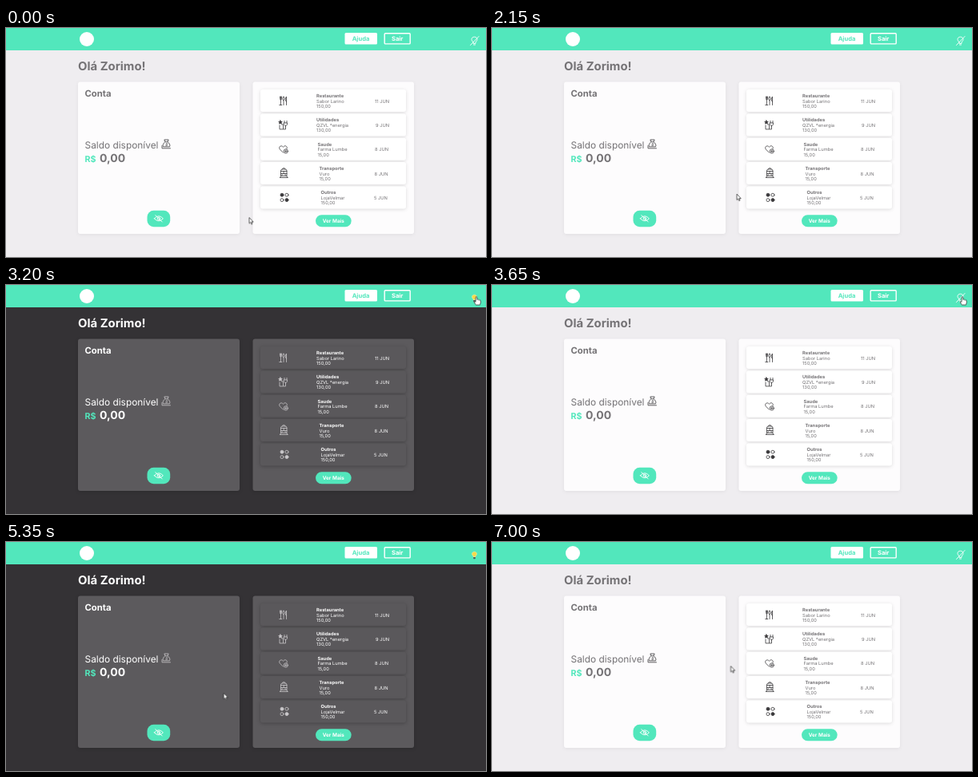
Write an HTML page that moves like this. It is 600x287 px and loops after 7.35 s.

```html
<!DOCTYPE html>
<html lang="pt">
<head>
<meta charset="utf-8">
<title>Conta</title>
<style>
html, body { margin: 0; width: 100%; height: 100%; overflow: hidden; }
svg { display: block; width: 100vw; height: 100vh; background: var(--bg);
  font-family: Inter, "Open Sans", sans-serif; text-rendering: geometricPrecision;
  --mint: #52e7bc; animation: theme 7.35s step-end infinite; }
text { fill: var(--ink); }
.b { font-weight: 700; }
.mint { fill: var(--mint); }
.white { fill: #fff; }
.mid { text-anchor: middle; font-weight: 700; }
.row { font-size: 5.75px; }
.card { fill: var(--card); filter: drop-shadow(0 1px 2px var(--soft)); }
.item { fill: var(--item); filter: drop-shadow(0 1.5px 2px var(--shade)); }
.icon { fill: none; stroke: var(--icon); stroke-width: .8; stroke-linecap: round; stroke-linejoin: round; }
.icon .full { fill: var(--icon); }
.line { fill: none; stroke: #fff; stroke-width: .9; stroke-linecap: round; stroke-linejoin: round; }
.off { visibility: var(--off); }
.on { visibility: var(--on); }
.shown { animation: shown 7.35s step-end infinite; }
.label { animation: drop 7.35s step-end infinite; }
.cursor { animation: move 7.35s linear infinite; }
.hand { animation: hand 7.35s step-end infinite; }
.arrow { animation: arrow 7.35s step-end infinite; }
.cursor path { fill: #fff; stroke: #222; stroke-width: .7; stroke-linejoin: round; }

@keyframes theme {
  0%, 49.6%, 80.9%, 100% {
    --bg: #efedf0; --card: #fdfcfd; --item: #fff; --ink: #757376; --icon: #3c3a3d;
    --soft: rgba(0,0,0,.06); --shade: rgba(0,0,0,.13); --off: visible; --on: hidden; }
  43.48%, 54.35% {
    --bg: #343235; --card: #5c5a5d; --item: #5a585b; --ink: #fff; --icon: #c9c7ca;
    --soft: rgba(0,0,0,.14); --shade: rgba(0,0,0,.25); --off: hidden; --on: visible; }
}
@keyframes shown { 0%, 23.76%, 100% { visibility: visible; } 17.63% { visibility: hidden; } }
@keyframes drop { 0%, 23.76%, 100% { transform: none; } 17.63% { transform: translateY(8.5px); } }
@keyframes hand {
  0%, 27.2%, 58.8%, 82.3%, 100% { visibility: hidden; }
  15.4%, 38.8%, 77.9% { visibility: visible; }
}
@keyframes arrow {
  0%, 27.2%, 58.8%, 82.3%, 100% { visibility: visible; }
  15.4%, 38.8%, 77.9% { visibility: hidden; }
}
@keyframes move {
  0% { transform: translate(304px, 237.5px); animation-timing-function: step-end; }
  6.75% { transform: translate(303px, 237.2px); }
  9.5% { transform: translate(303px, 237.2px); animation-timing-function: ease-in-out; }
  17% { transform: translate(198px, 238px); }
  24.3% { transform: translate(198px, 238px); animation-timing-function: ease-in; }
  28.2% { transform: translate(258px, 224px); }
  33.3% { transform: translate(488px, 148px); animation-timing-function: ease-out; }
  39.8% { transform: translate(588px, 14.5px); }
  55% { transform: translate(588px, 14.5px); animation-timing-function: ease-in; }
  59.5% { transform: translate(580px, 26px); }
  64% { transform: translate(420px, 130px); animation-timing-function: ease-out; }
  69.4% { transform: translate(200px, 228px); animation-timing-function: ease-in; }
  72.8% { transform: translate(272px, 189.5px); }
  76.2% { transform: translate(490px, 70px); animation-timing-function: ease-out; }
  78.9% { transform: translate(588px, 14.5px); }
  81.3% { transform: translate(588px, 14.5px); animation-timing-function: ease-in-out; }
  90.5% { transform: translate(300.5px, 156px); }
  91.8%, 100% { transform: translate(298.5px, 155.5px); }
}
</style>
</head>
<body>
<svg viewBox="0 0 600 287" preserveAspectRatio="none">
  <rect class="mint" width="600" height="28"/>
  <circle class="white" cx="101" cy="14" r="9"/>
  <rect class="white" x="423.5" y="6" width="40.5" height="14.5" rx="1.5"/>
  <text class="mid mint" x="443.5" y="16.2" font-size="7.6">Ajuda</text>
  <rect x="473.2" y="6.7" width="32" height="13.2" rx="1" fill="none" stroke="#fff" stroke-width="1.4"/>
  <text class="mid white" x="489.2" y="16.2" font-size="7.6">Sair</text>

  <g class="line off">
    <path d="M584 19v-1.4c-3-2-2.7-6.3 1.5-6.4 4.200 .1 4.500 4.400 1.500 6.400V19zM584.500 21h2M580.500 21.500L591 10.500"/>
  </g>
  <g class="on">
    <path d="M584 18.500v-1c-2.300-1.600-1.900-5.200 1.500-5.300 3.400 .1 3.800 3.700 1.500 5.300v1z" fill="#f7d84a" stroke="#fff3b0" stroke-width=".5"/>
    <path d="M584.200 19h2.600v1.500l-.6 .8h-1.400l-.6-.8z" fill="#555"/>
  </g>

  <text class="b" x="90" y="53" font-size="14.9">Olá Zorimo!</text>
  <rect class="card" x="90" y="67.500" width="202" height="190.500" rx="3"/>
  <rect class="card" x="308.500" y="67.500" width="201.500" height="190.500" rx="3"/>

  <text class="b" x="98.500" y="86.300" font-size="11.300">Conta</text>
  <g class="label">
    <text x="98.500" y="151" font-size="11.900">Saldo disponível</text>
    <g class="icon">
      <path d="M199 142.500l-1.200-2.500h5.400l-1.200 2.500zM199 142.500c-2.600 2-3.500 4.400-2.500 6.300h8c1-1.900 .1-4.300-2.500-6.300M195 147.500v3.300h10.500M202 144.800c-1.800-.7-2.400 .7-1.300 1.200 1.500 .5 1.200 2-.9 1.300"/>
    </g>
  </g>
  <g class="shown">
    <text class="b mint" x="98.500" y="167.500" font-size="10.700">R$</text>
    <text class="b" x="117" y="167.800" font-size="14">0,00</text>
  </g>
  <rect class="mint" x="176.500" y="228.800" width="28.700" height="20.400" rx="8"/>
  <g class="line">
    <path d="M185.400 238.800q5.500-6.200 11 0q-5.500 6.200-11 0z"/>
    <circle cx="190.900" cy="238.800" r="1.700"/>
    <path class="shown" d="M186.800 234.600l8.400 8.400"/>
  </g>

  <g class="row">
    <g>
      <rect class="item" x="318" y="77" width="182" height="28" rx="3"/>
      <g class="icon">
        <path d="M342.500 86v2.500q0 1.500 1 1.500t1-1.500V86M343.500 86v10.500M347 86c-1.600 1.200-1.600 4 0 5v5.500M347 86c1.400 1.200 1.400 4 0 5M350.500 96.500V86c-1.700 2-1.700 5 0 6.500M341.800 96.500h3"/>
      </g>
      <text class="b" x="388" y="87">Restaurante</text>
      <text x="388" y="93.500">Sabor Larino</text>
      <text x="388" y="100">150,00</text>
      <text x="461" y="93.500">11 JUN</text>
    </g>
    <g transform="translate(0 30.400)">
      <rect class="item" x="318" y="77" width="182" height="28" rx="3"/>
      <g class="icon">
        <path class="full" d="M343 85.500l.7 1.400 1.500 .2-1.100 1.100 .3 1.500-1.400-.7-1.400 .7 .3-1.500-1.100-1.100 1.500-.2z"/>
        <path d="M342 91.500v5h4.500v-6h-2M348 86v2.500M351 86v2.500M347.500 88.500h4v2l-1.200 1.500h-1.600l-1.200-1.500zM349.500 92v4.500H347"/>
      </g>
      <text class="b" x="388" y="87">Utilidades</text>
      <text x="388" y="93.500">QZVL *energia</text>
      <text x="388" y="100">130,00</text>
      <text x="462" y="93.500">9 JUN</text>
    </g>
    <g transform="translate(0 60.700)">
      <rect class="item" x="318" y="77" width="182" height="28" rx="3"/>
      <g class="icon">
        <path d="M346.500 95.500l-4-4c-2.500-2.800 1.300-6.300 4-3 2.700-3.300 6 -.3 4.500 2.200"/>
        <circle cx="349.800" cy="93.700" r="2.600"/>
        <path d="M348.600 93.700h2.400M349.800 92.500v2.400"/>
      </g>
      <text class="b" x="389.500" y="87">Saude</text>
      <text x="389.500" y="93.500">Farma Lumbe</text>
      <text x="389.500" y="100">15,00</text>
      <text x="461" y="93.500">8 JUN</text>
    </g>
    <g transform="translate(0 91)">
      <rect class="item" x="318" y="77" width="182" height="28" rx="3"/>
      <g class="icon">
        <path d="M343.500 94v-6q0-2 2-2h3.500q2 0 2 2v6zM343.500 88.500h7.500M343.500 91.500h7.500M347.200 88.500v3M342.500 96.500h9.500M344 94l-1.500 2.500M350.500 94l1.500 2.500M345 93h1M348.500 93h1M345.500 86l.5-1.200h2.500l.5 1.200"/>
      </g>
      <text class="b" x="391.500" y="87">Transporte</text>
      <text x="391.500" y="93.500">Vuro</text>
      <text x="391.500" y="100">15,00</text>
      <text x="460.500" y="93.500">8 JUN</text>
    </g>
    <g transform="translate(0 121.400)">
      <rect class="item" x="318" y="77" width="182" height="28" rx="3"/>
      <g class="icon">
        <circle class="full" cx="345" cy="87.800" r="2"/>
        <circle cx="351" cy="87.800" r="2"/>
        <circle cx="345" cy="94.200" r="2"/>
        <circle class="full" cx="351" cy="94.200" r="2"/>
      </g>
      <text class="b" x="393.500" y="87">Outros</text>
      <text x="393.500" y="93.500">LojaVelmar</text>
      <text x="393.500" y="100">150,00</text>
      <text x="460" y="93.500">5 JUN</text>
    </g>
  </g>

  <rect class="mint" x="387" y="234.300" width="44.700" height="15" rx="7.500"/>
  <text class="mid white" x="409.300" y="244.100" font-size="6.400">Ver Mais</text>

  <g class="cursor">
    <path class="arrow" d="M0 0V7.400L1.700 5.900 2.800 8.400 4 7.900 2.900 5.500H5.200Z"/>
    <path class="hand" d="M-.9 .7Q0-.6 .9 .7V3.800Q1.900 3 2.600 4.100 3.500 3.500 4.100 4.600 5.300 4.300 5.300 5.600V7.800L4.300 10.500H-.5L-2.900 6.900Q-2.900 5.400-.9 6.600Z"/>
  </g>
</svg>
</body>
</html>
```
